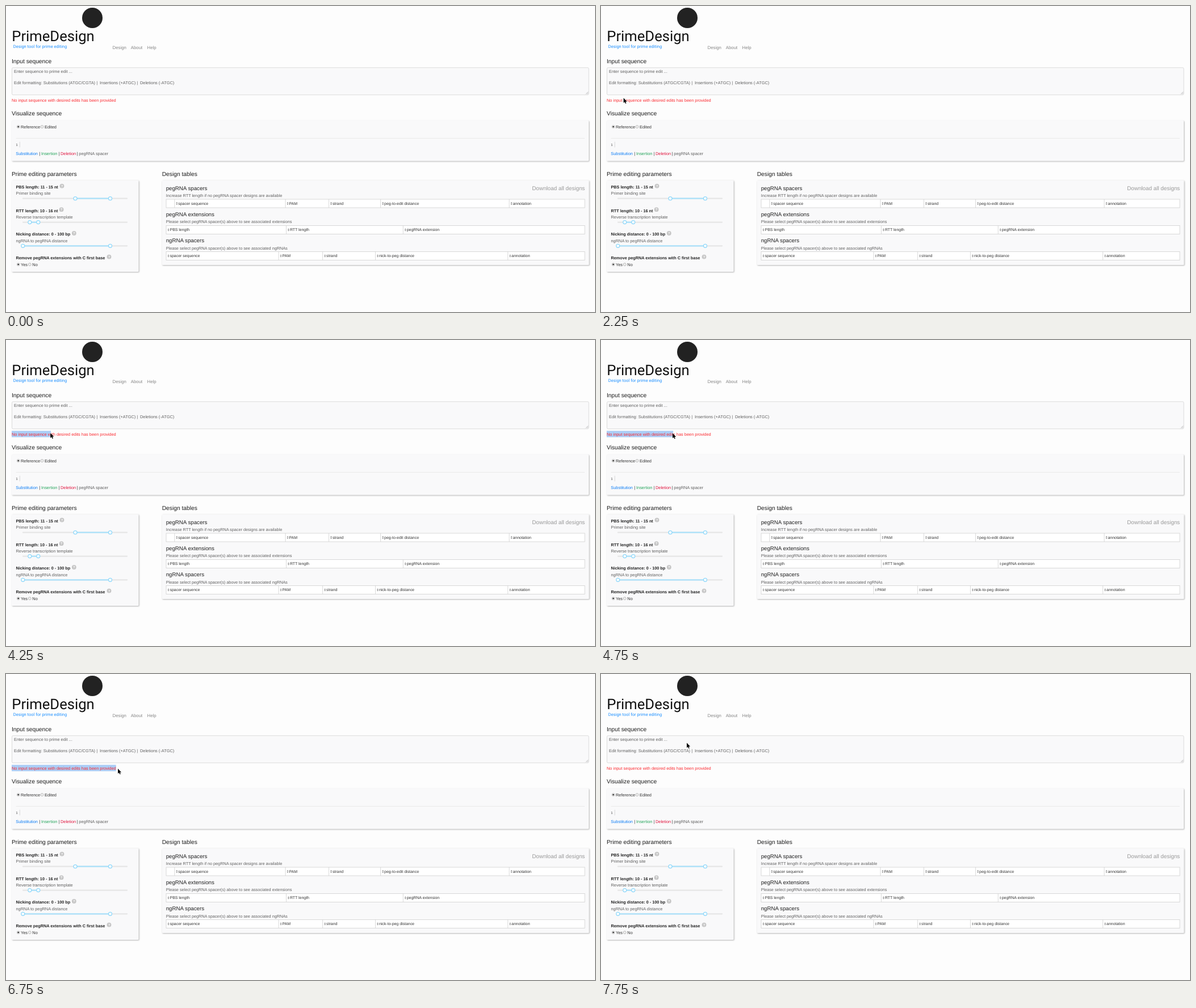
Animation, 1037 px wide and 540 px high, one loop 8000 ms. Source, as an HTML page:

```html
<!DOCTYPE html>
<html lang="en">
<head>
<meta charset="utf-8">
<title>PrimeDesign</title>
<style>
  html, body { margin: 0; width: 100%; height: 100%; overflow: hidden; background: #fdfdfd; }
  svg { display: block; width: 1037px; height: 540px; }
  text { font-family: "Liberation Sans", Arial, sans-serif; font-size: 7.4px; fill: #606060; text-rendering: geometricPrecision; white-space: pre; }
  .brand { font-family: Roboto, sans-serif; font-size: 25.6px; fill: #111; }
  .tag { font-family: Roboto, sans-serif; font-size: 7.5px; fill: #1e90ff; }
  .nav { font-size: 7.8px; fill: #858585; }
  .h1 { font-size: 10.25px; fill: #1c1c1c; }
  .h2 { font-size: 9.7px; fill: #222; }
  .link { font-size: 9.85px; fill: #999; text-anchor: end; }
  .bold { font-size: 7.27px; font-weight: bold; fill: #222; }
  .note { font-size: 7.28px; }
  .dark { fill: #333; }
  .cell { font-size: 6.95px; fill: #333; }
  .line { font-family: "DejaVu Sans Mono", monospace; font-size: 5.6px; fill: #444; }
  .help { font-size: 6px; font-weight: bold; fill: #fff; text-anchor: middle; }
  .red { fill: #fb2a30; }
  .blue { fill: #0a7cf5; }
  .green { fill: #22a35a; }
  .crimson { fill: #e0123c; }
  .panel { fill: #f9f9fa; filter: drop-shadow(1.3px 1.3px 0.8px #b4b4b4); }
</style>
</head>
<body>
<svg id="stage" viewBox="0 0 1037 540" xmlns="http://www.w3.org/2000/svg"></svg>
<script>
const stage = document.getElementById('stage');

function add(tag, attrs, content) {
  const el = document.createElementNS('http://www.w3.org/2000/svg', tag);
  for (const key in attrs) el.setAttribute(key, attrs[key]);
  if (content) el.textContent = content;
  stage.append(el);
  return el;
}
const text = (x, y, cls, s) => add('text', { x, y, class: cls }, s);
const rect = (x, y, width, height, more) => add('rect', { x, y, width, height, ...more });
const circle = (cx, cy, r, more) => add('circle', { cx, cy, r, ...more });
const path = (d, more) => add('path', { d, fill: 'none', ...more });

function radio(x, y, on) {
  circle(x, y, 2.5, { fill: on ? '#fff' : '#eee', stroke: '#999', 'stroke-width': 0.6 });
  if (on) circle(x, y, 1.4, { fill: '#333' });
}

function help(x, y) {
  circle(x, y, 3.9, { fill: '#c6c6c6' });
  text(x, y + 2.1, 'help', '?');
}

function slider(y, from, to) {
  const bar = { 'stroke-width': 2.3, 'stroke-linecap': 'round' };
  path(`M30 ${y}H213`, { ...bar, stroke: '#e6e6e6' });
  path(`M${from} ${y}H${to}`, { ...bar, stroke: '#abe2fb' });
  for (const x of [from, to]) circle(x, y, 3, { fill: '#fff', stroke: '#8fd8fa', 'stroke-width': 1.2 });
}

// cols: [left edge, label]
function table(y, cols) {
  const edge = { stroke: '#d0d0d0', 'stroke-width': 0.8 };
  rect(282, y, 737, 15, { fill: '#fff', ...edge });
  for (const [x, label] of cols) {
    if (x > 282) path(`M${x} ${y}v15`, edge);
    const m = y + 7.5;
    path(`M${x + 2.4} ${m - 0.5}h3.2l-1.6 -2zM${x + 2.4} ${m + 0.5}h3.2l-1.6 2z`, { fill: '#888' });
    text(x + 6.5, y + 9.9, 'cell', label);
  }
}

// Header
circle(152, 21, 18, { fill: '#222' });
text(10.3, 62.3, 'brand', 'PrimeDesign');
text(12.8, 73.7, 'tag', 'Design tool for prime editing');
text(187.6, 75.8, 'nav', 'Design');
text(219.8, 75.8, 'nav', 'About');
text(248.5, 75.8, 'nav', 'Help');

// Input
text(10, 101.3, 'h1', 'Input sequence');
rect(10.5, 108.8, 1015.5, 48, { rx: 2, fill: '#f9f9fa', stroke: '#d3d3d3', 'stroke-width': 0.8 });
path('M1021 155.5l4 -4M1023.2 155.5l1.8 -1.8', { stroke: '#888', 'stroke-width': 0.6 });
text(14, 118, '', 'Enter sequence to prime edit ...');
text(14, 137.5, '', 'Edit formatting: Substitutions (ATGC/CGTA)');
text(159.2, 137.5, '', '|');
text(165, 137.5, '', 'Insertions (+ATGC)');
text(230.2, 137.5, '', '|');
text(236, 137.5, '', 'Deletions (-ATGC)');
const mark = rect(10, 160.3, 0, 11.2, { fill: '#abcdf6' });
const message = text(10, 168.6, 'red', 'No input sequence with desired edits has been provided');

// Sequence view
text(10, 193.3, 'h1', 'Visualize sequence');
rect(10, 202, 1016, 71.5, { class: 'panel', rx: 1.5 });
radio(21.7, 213.1, true);
text(26, 215.6, 'dark', 'Reference');
radio(63.5, 213.1, false);
text(68, 215.6, 'dark', 'Edited');
path('M17.5 233.5H1019', { stroke: '#e6e6e6', 'stroke-width': 0.8 });
text(17.2, 247, 'line', '1');
path('M24.3 239.5v10', { stroke: '#ccc', 'stroke-width': 0.7 });
text(17.3, 263.2, 'blue', 'Substitution');
text(58.2, 263.2, 'dark', '|');
text(62, 263.2, 'green', 'Insertion');
text(92.6, 263.2, 'dark', '|');
text(96, 263.2, 'crimson', 'Deletion');
text(124.8, 263.2, 'dark', '|');
text(128.3, 263.2, '', 'pegRNA spacer');

// Parameters
text(10, 299.8, 'h1', 'Prime editing parameters');
rect(10, 307.5, 223.5, 161.5, { class: 'panel', rx: 1.5 });
text(17.5, 321.8, 'bold', 'PBS length: 11 - 15 nt');
help(98.5, 317.6);
text(17.5, 333.4, '', 'Primer binding site');
slider(339.7, 122, 183.5);
text(17.5, 363.6, 'bold', 'RTT length: 10 - 16 nt');
help(97.6, 359.2);
text(17.5, 375.1, '', 'Reverse transcription template');
slider(381.6, 41.8, 56.8);
text(17.5, 405.1, 'bold', 'Nicking distance: 0 - 100 bp');
help(119.8, 401);
text(17.5, 416.6, '', 'ngRNA to pegRNA distance');
slider(423.3, 29.8, 183.5);
text(17.5, 446.9, 'bold', 'Remove pegRNA extensions with C first base');
help(181.5, 442.6);
radio(21.7, 456.1, true);
text(26, 458.7, 'dark', 'Yes');
radio(41.8, 456.1, false);
text(46.3, 458.7, 'dark', 'No');

// Design tables
text(274.7, 299.8, 'h1', 'Design tables');
rect(274.5, 307.5, 752, 149.5, { class: 'panel', rx: 1.5 });
text(281.7, 324.9, 'h2', 'pegRNA spacers');
text(1019.3, 324.9, 'link', 'Download all designs');
text(281.7, 337.1, 'note', 'Increase RTT length if no pegRNA spacer designs are available');
table(341, [[296.8, 'spacer sequence'], [492, 'PAM'], [568.4, 'strand'], [659.6, 'peg-to-edit distance'], [886, 'annotation']]);
text(281.7, 371.3, 'h2', 'pegRNA extensions');
text(281.7, 383.4, 'note', 'Please select pegRNA spacer(s) above to see associated extensions');
table(387.4, [[282, 'PBS length'], [493.4, 'RTT length'], [699.2, 'pegRNA extension']]);
text(281.7, 417.4, 'h2', 'ngRNA spacers');
text(281.7, 429.6, 'note', 'Please select pegRNA spacer(s) above to see associated ngRNAs');
table(433.4, [[282, 'spacer sequence'], [480, 'PAM'], [557.6, 'strand'], [650.4, 'nick-to-peg distance'], [883.6, 'annotation']]);

const pointer = path('M0 0V8.7L2 6.9L3.4 10L4.8 9.4L3.5 6.4H6.1Z',
  { fill: '#000', stroke: '#fff', 'stroke-width': 0.6, 'paint-order': 'stroke' });

// [ms, pointer x, pointer y, selected characters]
const steps = [
  [1500, 33, 141, 0], [1750, 55, 139.3, 0], [2000, 63.5, 140.6, 0], [2250, 39.7, 162.3, 0],
  [2500, 20.2, 170, 0], [2750, 20.6, 170.4, 0], [3000, 10.2, 169.5, 0], [3250, 6.2, 167.2, 0],
  [3750, 16, 167, 2], [4000, 40.2, 166.5, 9], [4250, 78.2, 164.2, 19], [4500, 102, 164.2, 27],
  [4750, 126, 164.6, 35], [5000, 151.2, 165, 42], [5250, 172.2, 164.6, 48], [5500, 187, 163.8, 53],
  [5750, 192, 163, 54], [6000, 192.2, 162.3, 54], [6500, 192.4, 162.8, 54], [6750, 197, 167, 54],
  [7000, 197, 167, 0], [7250, 168.3, 148.3, 0], [7500, 153, 128.8, 0], [7750, 151, 121.5, 0]
];
const loop = 8000;
const start = performance.now();

function draw() {
  const t = (performance.now() - start) % loop;
  const step = steps.filter(s => s[0] <= t).pop();
  pointer.setAttribute('visibility', step ? 'visible' : 'hidden');
  const [, x, y, count] = step || [0, 0, 0, 0];
  pointer.setAttribute('transform', `translate(${x} ${y})`);
  mark.setAttribute('width', count ? message.getSubStringLength(0, count) : 0);
  requestAnimationFrame(draw);
}
draw();
</script>
</body>
</html>
```
